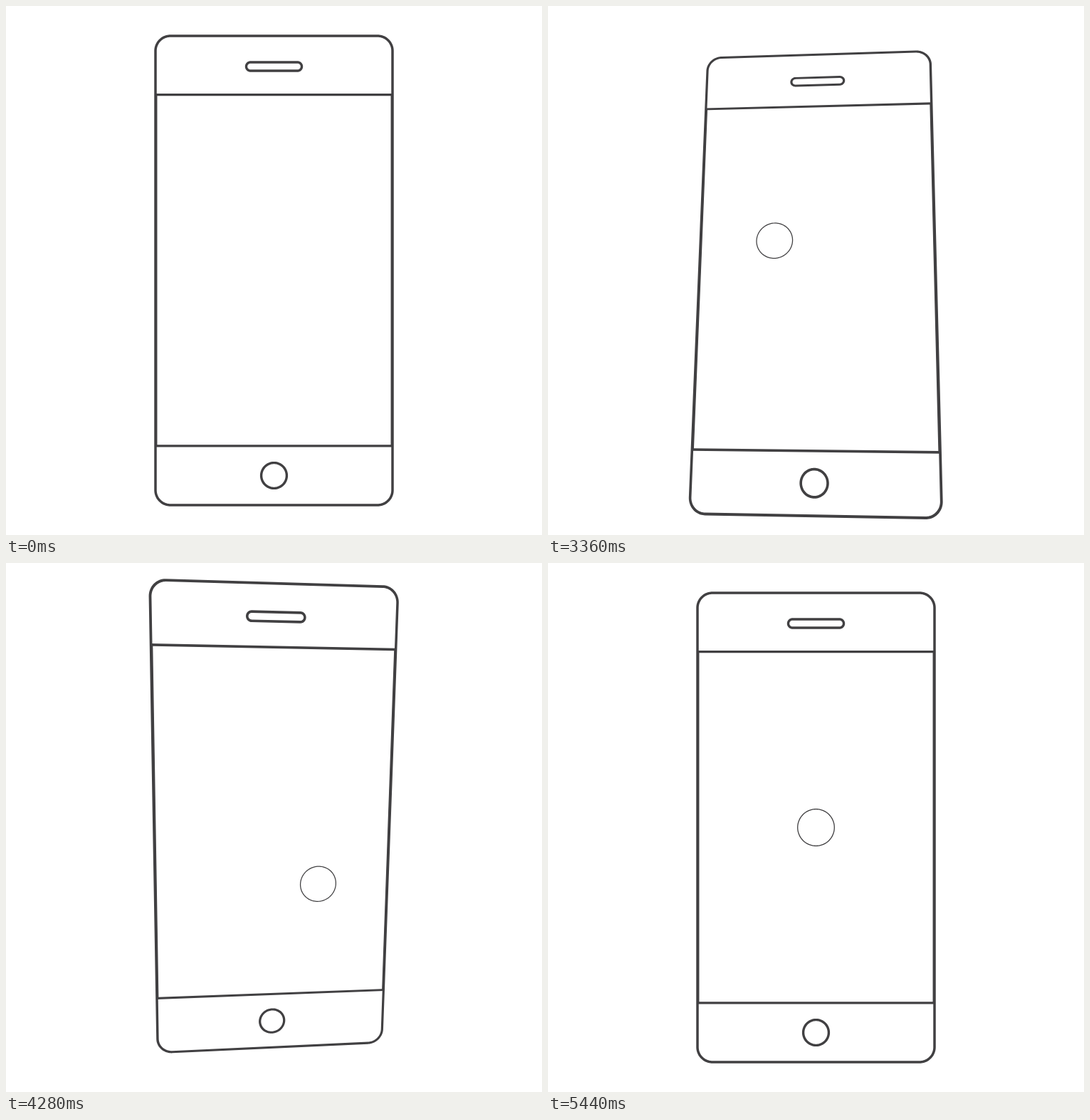
These frames come from a looping animation (753x743 px, 7.8 s). An HTML page with a canvas:

```html
<!DOCTYPE html>
<html lang="en">
<head>
<meta charset="utf-8">
<title>Tilting phone</title>
<style>
html, body { margin: 0; width: 100%; height: 100%; overflow: hidden; background: #fff; }
canvas { display: block; }
</style>
</head>
<body>
<canvas id="stage" width="753" height="743"></canvas>
<script>
const ctx = document.getElementById('stage').getContext('2d');
const LOOP = 7800, STEP = 40, DEPTH = 1046;
const CX = 376.5, CY = 371.5;
const BEGIN = 2760, END = 5440, LEG = 450;

const clamp = (v, lo, hi) => Math.min(hi, Math.max(lo, v));
const mix = (a, b, f) => a + (b - a) * f;

// Counter-clockwise from the top, in degrees
function polar(angle, r) {
  const a = angle * Math.PI / 180;
  return [-r * Math.sin(a), -r * Math.cos(a)];
}

// Lean in degrees towards the far side: a quarter turn further on each leg
const LEAN = [0, 18.2, 12.7, 15.9, 17.4, 18.2, 0].map((reach, k) =>
  [clamp(BEGIN - 10 + k * LEG, BEGIN, END), ...polar((k - 1) * 90, reach)]);

// Ball on the phone plane: time, angle, distance from the centre
const BALL = [
  [BEGIN, 0, 0], [3360, 53.6, 74], [3760, 132.7, 105],
  [4280, 218, 105], [5000, 358.6, 149], [END, 360, 0]
];

function at(keys, t) {
  let i = 0;
  while (i < keys.length - 2 && t >= keys[i + 1][0]) i++;
  const [t0, a0, b0] = keys[i], [t1, a1, b1] = keys[i + 1];
  const f = clamp((t - t0) / (t1 - t0), 0, 1);
  return [mix(a0, a1, f), mix(b0, b1, f)];
}

// Rotation about an axis lying in the plane, then perspective
function camera([ax, ay]) {
  const size = Math.hypot(ax, ay), a = size * Math.PI / 180;
  const dx = size ? ax / size : 0, dy = size ? ay / size : 0;
  const sin = Math.sin(a), shrink = Math.cos(a) - 1;
  return (x, y) => {
    const along = x * dx + y * dy;
    const s = DEPTH / (DEPTH + along * sin);
    return [CX + (x + dx * along * shrink) * s, CY + (y + dy * along * shrink) * s];
  };
}

function outline(view, x, y, hw, hh, r) {
  const n = 24;
  for (let q = 0; q < 4; q++) {
    const kx = x + (q === 0 || q === 3 ? 1 : -1) * (hw - r);
    const ky = y + (q < 2 ? 1 : -1) * (hh - r);
    for (let i = 0; i <= n; i++) {
      const a = (q + i / n) * Math.PI / 2;
      const p = view(kx + r * Math.cos(a), ky + r * Math.sin(a));
      if (q || i) ctx.lineTo(...p); else ctx.moveTo(...p);
    }
  }
  ctx.closePath();
}

// A stroked rounded box, filled between its outer and inner outlines
function ring(view, x, y, hw, hh, r, w) {
  const h = w / 2;
  ctx.beginPath();
  outline(view, x, y, hw + h, hh + h, r ? r + h : 0);
  outline(view, x, y, hw - h, hh - h, r ? r - h : 0);
  ctx.fill('evenodd');
}

function draw(t) {
  const view = camera(at(LEAN, t));
  ctx.fillStyle = '#fff';
  ctx.fillRect(0, 0, 753, 743);
  ctx.fillStyle = '#414042';
  ring(view, 0, 0, 166.5, 329.5, 21, 3.5);
  ring(view, 0, -0.2, 165.7, 246.6, 0, 3.3);
  ring(view, 0, -286.5, 39, 6, 6, 3.4);
  ring(view, 0, 288, 17.9, 17.9, 17.9, 3.4);

  ctx.globalAlpha = clamp((t - 1840) / 320, 0, 1);
  ring(view, ...polar(...at(BALL, t)), 25.8, 25.8, 25.8, 1.3);
  ctx.globalAlpha = 1;
}

const start = performance.now();
function tick() {
  const t = (performance.now() - start) % LOOP;
  draw(Math.floor(t / STEP) * STEP);
  requestAnimationFrame(tick);
}
tick();
</script>
</body>
</html>
```
